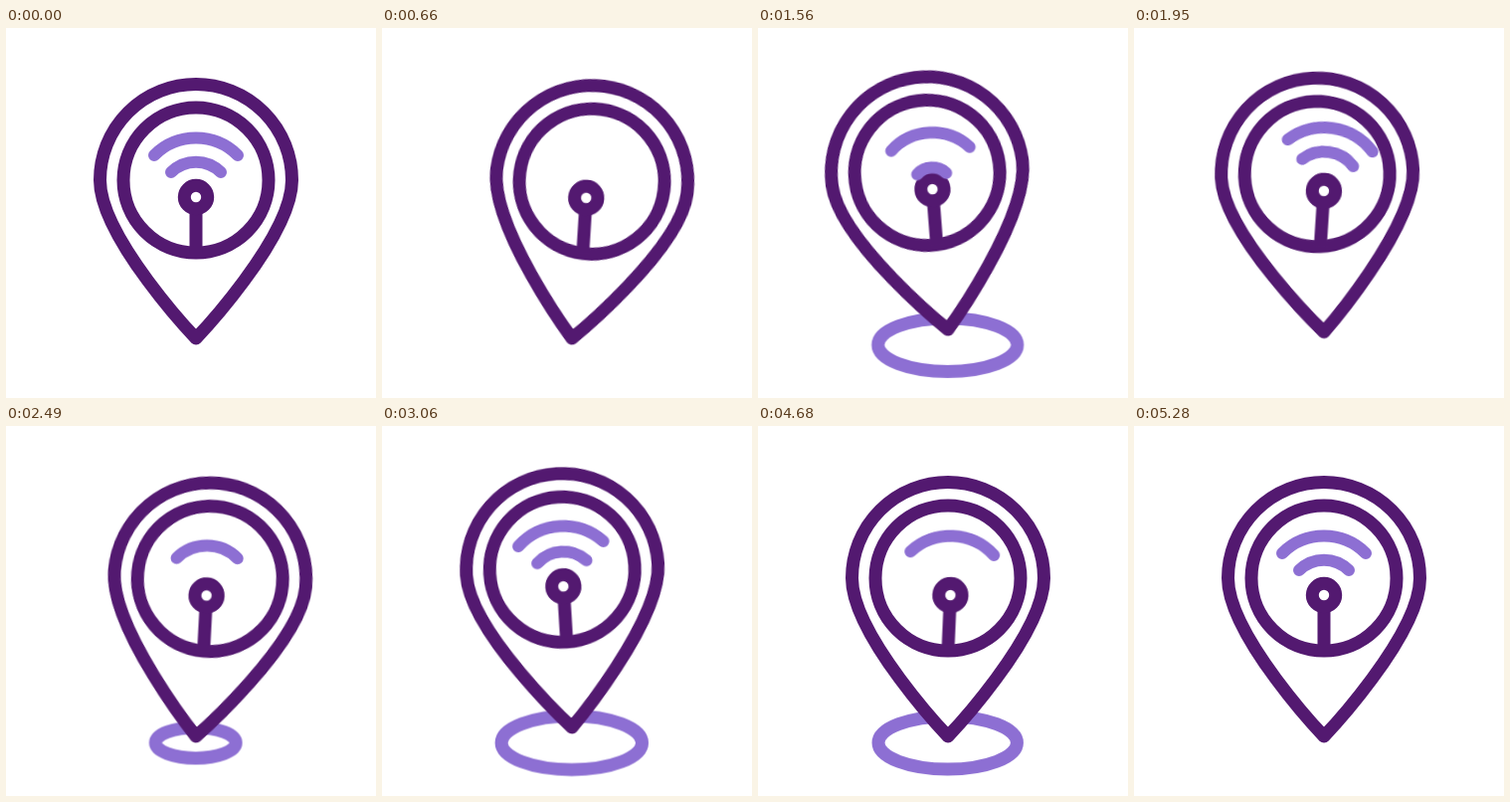
An HTML page without scripts that plays this animation: 372 px wide and 372 px high, repeating every 5.4 s.

```html
<!DOCTYPE html>
<html lang="en">
<head>
<meta charset="utf-8">
<title>Swaying wireless location pin</title>
<style>
  :root {
    --dark: #531970;
    --light: #8d6fd3;
    --smooth: cubic-bezier(.37, 0, .63, 1);
    --spread: cubic-bezier(.25, .46, .45, .94);
  }
  html, body { margin: 0; width: 100%; height: 100%; overflow: hidden; background: #fff; }
  svg { display: block; width: 100%; height: 100%; }
  path, circle, ellipse { fill: none; stroke: var(--dark); stroke-width: 13; stroke-linejoin: round; }

  .bounce, .sway, .antenna, .waves { animation: 5400ms var(--smooth) infinite; }
  .bounce  { animation-name: bounce; }
  .sway    { animation-name: sway; transform-origin: 191px 312px; }
  .antenna { animation-name: antenna; transform-origin: 191px 226px; }
  .waves   { animation-name: waves; transform-origin: 191px 170px; }
  .arc, .ripple { animation: 5400ms var(--spread) infinite; stroke: var(--light); vector-effect: non-scaling-stroke; }
  .arc     { stroke-width: 12; stroke-linecap: round; transform-origin: 191px 170px; }
  .outer   { animation-name: outer; }
  .inner   { animation-name: inner; }
  .ripple  { animation-name: ripple; transform-origin: 190.7px 318.5px; }
  .body    { fill: #fff; }

  @keyframes bounce {
    0%, 100%       { transform: translateY(0); }
    19.44%, 46.3%  { transform: translateY(0); animation-timing-function: cubic-bezier(.39, .575, .565, 1); }
    30.56%, 56.48% { transform: translateY(-9px); animation-timing-function: cubic-bezier(.47, 0, .745, .715); }
    41.67%, 70%    { transform: translateY(0); }
  }
  @keyframes sway {
    0%, 4.44%    { transform: rotate(0deg); }
    16.3%        { transform: rotate(9.8deg); }
    30.37%       { transform: rotate(-8deg); }
    43.52%       { transform: rotate(5.8deg); }
    58.89%       { transform: rotate(-4deg); }
    73.33%       { transform: rotate(1.8deg); }
    84.44%, 100% { transform: rotate(0deg); }
  }
  @keyframes antenna {
    0%, 4.44%   { transform: rotate(0deg); }
    13.9%       { transform: rotate(-4deg); }
    22.2%       { transform: rotate(0deg); }
    35.5%       { transform: rotate(6.2deg); }
    47.5%       { transform: rotate(-2.4deg); }
    64%         { transform: rotate(1.8deg); }
    77%         { transform: rotate(-1.5deg); }
    86.7%       { transform: rotate(2.5deg); }
    96.3%, 100% { transform: rotate(0deg); }
  }
  @keyframes waves {
    0%, 24%     { transform: translateY(0) rotate(0deg); }
    36.1%       { transform: translateY(-3px) rotate(4.4deg); }
    46.1%       { transform: translateY(-7px) rotate(-2.7deg); }
    52%, 60%    { transform: translateY(0) rotate(0deg); }
    67.8%       { transform: translateY(-7px) rotate(1.8deg); }
    77.8%, 100% { transform: translateY(0) rotate(0deg); }
  }
  /* Each arc grows out of the antenna, drifts a little and vanishes at once. */
  @keyframes outer {
    0%, 3.33%      { transform: scale(1); }
    11.67%         { transform: scale(1.06); }
    11.68%, 23.51% { transform: scale(0); }
    23.52%         { transform: scale(.4); }
    31.48%         { transform: scale(1); }
    40.56%         { transform: scale(1.03); }
    40.57%, 43.88% { transform: scale(0); }
    43.89%         { transform: scale(.5); }
    52.78%         { transform: scale(1); }
    70.56%         { transform: scale(1.05); }
    70.57%, 75.55% { transform: scale(0); }
    75.56%         { transform: scale(.4); }
    84.44%, 100%   { transform: scale(1); }
  }
  @keyframes inner {
    0%, 3.33%      { transform: scale(1); }
    11.67%         { transform: scale(1.06); }
    11.68%, 27.77% { transform: scale(0); }
    27.78%         { transform: scale(.4); }
    34.81%         { transform: scale(1.02); }
    40.56%         { transform: scale(1.05); }
    40.57%, 49.99% { transform: scale(0); }
    50%            { transform: scale(.4); }
    57.41%         { transform: scale(1); }
    70.56%         { transform: scale(1.07); }
    70.57%, 88.32% { transform: scale(0); }
    88.33%         { transform: scale(.4); }
    96.3%, 100%    { transform: scale(1); }
  }
  @keyframes ripple {
    0%, 15.73%, 34.27%, 42.21%, 61.86%, 70.36%, 95.38%, 100% { transform: scale(0); }
    15.74%, 42.22%, 70.37% { transform: scale(.27); }
    34.26%, 61.85%         { transform: scale(.98); }
    95.37%                 { transform: scale(1); }
  }
</style>
</head>
<body>
<svg viewBox="0 0 372 372">
  <ellipse class="ripple" cx="190.7" cy="318.5" rx="76" ry="29"/>
  <g class="bounce">
    <g class="sway">
      <path class="body" d="M191 312C191 312 94.5 211 94.5 153A96.5 96.5 0 0 1 287.5 153C287.5 211 191 312 191 312Z"/>
      <circle cx="191" cy="153" r="73"/>
      <g class="antenna">
        <path d="M191 226V182"/>
        <circle cx="191" cy="170" r="11.7"/>
        <g class="waves">
          <path class="arc outer" d="M149 128A59.4 59.4 0 0 1 233 128"/>
          <path class="arc inner" d="M166 145A35.4 35.4 0 0 1 216 145"/>
        </g>
      </g>
    </g>
  </g>
</svg>
</body>
</html>
```
